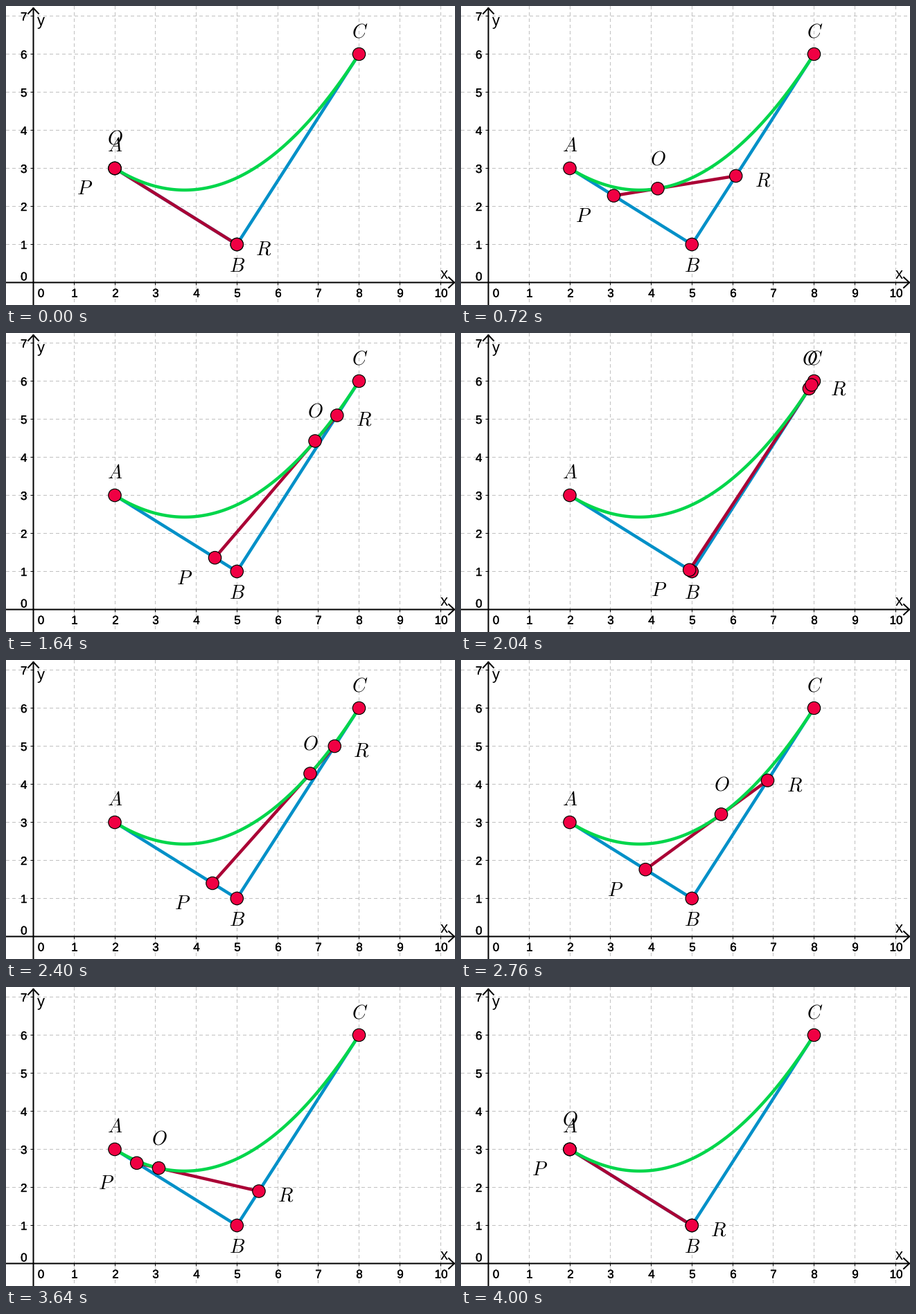
Recreate the animation shown at these times as a matplotlib script. Size 648x432 px, loop 4.04 s.

```python
import numpy as np
import matplotlib.pyplot as plt
import matplotlib.patheffects as pe
from matplotlib.animation import FuncAnimation
from matplotlib.patches import Circle

plt.rcParams["mathtext.fontset"] = "cm"
plt.rcParams["font.family"] = "Liberation Sans"

W, H = 648, 432
FRAMES, STEP_MS = 101, 40
ORIGIN = X0, Y0 = np.array([39.5, 399.5])
UNIT = np.array([58.75, -55.0])
BLUE, GREEN, CRIMSON, RED = "#0090c8", "#00d64b", "#aa0035", "#f00043"
GRAY = "#c0c0c0"


def px(x, y):
    return ORIGIN + UNIT * (x, y)


A, B, C = px(2, 3), px(5, 1), px(8, 6)

fig = plt.figure(figsize=(W / 72, H / 72), dpi=72, facecolor="white")
ax = fig.add_axes([0, 0, 1, 1])
ax.set(xlim=(0, W), ylim=(H, 0))
ax.axis("off")


def line(pts, color, width, z, **kw):
    xs, ys = np.transpose(pts)
    return ax.plot(xs, ys, color=color, lw=width, zorder=z, snap=False, **kw)[0]


def dot(p, z):
    return ax.add_patch(Circle(p, 9.2, fc=RED, ec="black", lw=1.2, zorder=z))


def name(letter, p):
    return ax.text(*p, f"${letter}$", size=28, ha="center", va="baseline", zorder=20)


def number(n, x, y, ha):
    bolder = [pe.withStroke(linewidth=0.35, foreground="black")]
    ax.text(x, y, str(n), size=17, ha=ha, va="baseline", path_effects=bolder)


# Grid, ticks and numbers; thin lines sit on pixel centres
grid = dict(dashes=(5, 4), dash_capstyle="butt")
for n in range(1, 11):
    x = np.floor(px(n, 0)[0]) + 0.5
    line([(x, 0), (x, H)], GRAY, 1, 1, **grid)
    line([(x, Y0), (x, Y0 + 3.5)], "black", 1, 2)
    number(n, x + 0.5, 420.5, "center")
for n in range(1, 8):
    y = np.floor(px(0, n)[1]) + 0.5
    line([(0, y), (W, y)], GRAY, 1, 1, **grid)
    line([(X0 - 3.5, y), (X0, y)], "black", 1, 2)
    number(n, 30.5, y + 6.5, "right")
number(0, 50.5, 420.5, "center")
number(0, 30.5, 396.5, "right")

# Axes
line([(0, Y0), (W, Y0)], "black", 2, 3)
line([(X0, 3), (X0, H)], "black", 2, 3)
line([(639, Y0 - 7.5), (647, Y0), (639, Y0 + 7.5)], "black", 2, 3)
line([(X0 - 7.5, 11), (X0, 3), (X0 + 7.5, 11)], "black", 2, 3)
ax.text(632.5, 394, "x", size=22, ha="center", va="baseline")
ax.text(50, 28, "y", size=22, ha="center", va="baseline")

# Control polygon and curve
line([A, B], BLUE, 4.5, 4)
line([B, C], BLUE, 4.5, 4)
chord = line([A, B], CRIMSON, 4.5, 5, solid_capstyle="butt")
s = np.linspace(0, 1, 120)[:, None]
line((1 - s) ** 2 * A + 2 * s * (1 - s) * B + s ** 2 * C, GREEN, 4.5, 6)

for p in (A, B, C):
    dot(p, 7)
name("A", A + (0, -24))
name("B", B + (0.5, 40))
name("C", C + (1, -24))

OFFSETS = {"P": (-43.7, 38), "O": (0.5, -34.5), "R": (38.8, 15)}
dots = {k: dot(A, 8 + i) for i, k in enumerate("POR")}
names = {k: name(k, A) for k in "POR"}


def update(i):
    t = 1 - abs(i - 50) / 50
    p, r = A + t * (B - A), B + t * (C - B)
    pos = {"P": p, "O": p + t * (r - p), "R": r}
    chord.set_data([p[0], r[0]], [p[1], r[1]])
    for k, q in pos.items():
        dots[k].center = q
        names[k].set_position(q + OFFSETS[k])
    return [chord, *dots.values(), *names.values()]


anim = FuncAnimation(fig, update, frames=FRAMES, interval=STEP_MS,
                     repeat=True, repeat_delay=0, blit=False)
plt.show()
```
